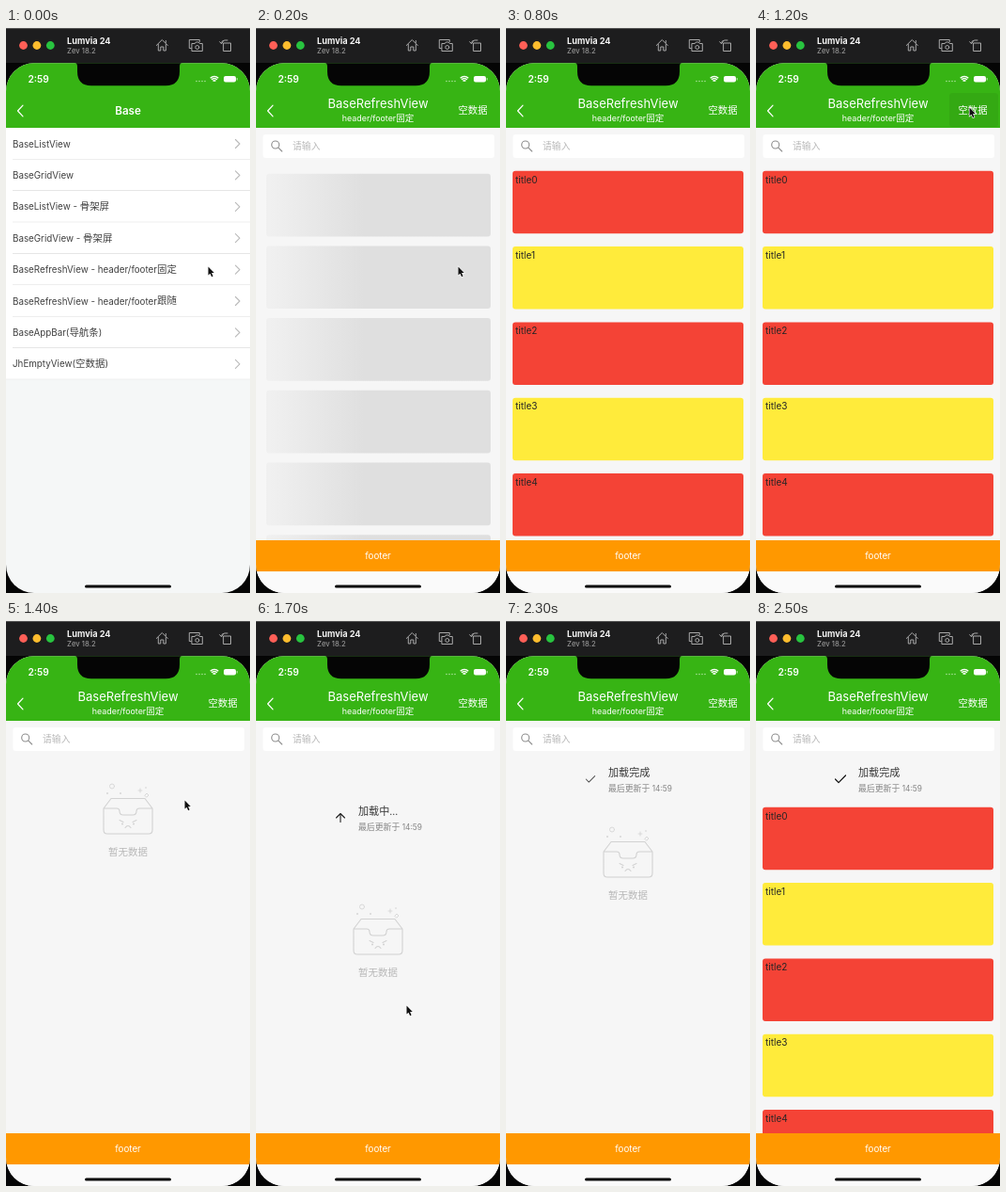
An HTML page with a canvas that plays this animation: 260 px wide and 600 px high, repeating every 2600 ms.

```html
<!DOCTYPE html>
<html lang="zh-CN">
<head>
<meta charset="utf-8">
<title>Refresh view</title>
<style>
html, body { margin: 0; width: 100%; height: 100%; overflow: hidden; background: #000; }
canvas { display: block; width: 260px; height: 600px; }
</style>
</head>
<body>
<canvas id="stage"></canvas>
<script>
const LOOP = 2600, STEP = 100;
const W = 260, H = 600;
const canvas = document.getElementById('stage');
const ctx = canvas.getContext('2d');
const dpr = window.devicePixelRatio || 1;
canvas.width = W * dpr;
canvas.height = H * dpr;

const GREEN = '#37b414', RED = '#f44336', YELLOW = '#ffeb3b', ORANGE = '#ff9800';
const FONT = 'Inter, "Noto Sans CJK SC", "Noto Sans CJK", sans-serif';
const CJK = /([\u3400-\u9fff]+)/;

// Key points: time, value(s)
const CURSOR = [[0, 215, 253], [300, 215, 253], [400, 221, 400], [500, 226, 596],
  [600, 227, 612], [900, 227, 612], [1000, 228, 330], [1100, 228, 130], [1200, 227, 84],
  [1300, 227, 84], [1400, 190, 190], [1500, 160, 270], [1600, 160, 350], [1700, 160, 408],
  [1800, 160, 408], [1900, 200, 470], [2000, 220, 612], [2600, 220, 612]];
const PULL = [[0, 0], [1500, 0], [1600, 66], [1700, 128], [1800, 68], [1900, 46], [2600, 46]];

function keyed(keys, t) {
  let i = 1;
  while (i < keys.length - 1 && t > keys[i][0]) i++;
  const a = keys[i - 1], b = keys[i];
  const k = Math.min(1, (t - a[0]) / (b[0] - a[0]));
  return a.slice(1).map((v, n) => v + (b[n + 1] - v) * k);
}

function rect(x, y, w, h, color, r = 0) {
  ctx.fillStyle = color;
  ctx.beginPath();
  ctx.roundRect(x, y, w, h, r);
  ctx.fill();
}

function disc(x, y, r, color) {
  ctx.fillStyle = color;
  ctx.beginPath();
  ctx.arc(x, y, r, 0, 7);
  ctx.fill();
}

function stroke(d, color, width = 1, x = 0, y = 0, scale = 1) {
  ctx.save();
  ctx.translate(x, y);
  ctx.scale(scale, scale);
  ctx.strokeStyle = color;
  ctx.lineWidth = width;
  ctx.lineJoin = ctx.lineCap = 'round';
  ctx.stroke(new Path2D(d));
  ctx.restore();
}

// Chinese runs are set slightly larger and higher than Latin ones
function text(str, x, y, size, color, { align = 'left', weight = 400 } = {}) {
  const runs = str.split(CJK).filter(Boolean).map(s => {
    const cjk = CJK.test(s);
    const font = `${weight} ${cjk ? size * 1.07 : size}px ${FONT}`;
    ctx.font = font;
    return { s, font, w: ctx.measureText(s).width, rise: cjk ? 0.03 : 0 };
  });
  const total = runs.reduce((sum, r) => sum + r.w, 0);
  if (align === 'center') x -= total / 2;
  if (align === 'right') x -= total;
  ctx.fillStyle = color;
  for (const r of runs) {
    ctx.font = r.font;
    ctx.fillText(r.s, x, y + size * (0.37 - r.rise));
    x += r.w;
  }
}

function toolbar() {
  rect(0, 0, W, 37, '#1d1d1e');
  rect(0, 0, W, 1, '#565656');
  ['#fe5f57', '#febc2e', '#28c33f'].forEach((c, i) => disc(18.5 + i * 14.4, 18.5, 4.4, c));
  text('Lumvia 24', 65, 14, 9.2, '#f4f4f4', { weight: 700 });
  text('Zev 18.2', 65, 24.3, 7.8, '#a4a4a4');
  const c = '#a9a9a9';
  stroke('M-6 0L0 -6L6 0M-4 -1V5.5H-1.5V1.5H1.5V5.5H4V-1M4 -5V-3', c, 1, 166.3, 18.5);
  stroke('M-5 3H-7V-6H4V-4M-4 -2H-1L0 -3.5H3L4 -2H7V6H-4ZM3.5 2A2 2 0 1 1 -0.5 2A2 2 0 1 1 3.5 2',
    c, 1, 202.3, 18.5);
  stroke('M-2.5 -2.5H5V6H-2.5ZM-5 -2Q-5 -5.5 -1.5 -5.5H1.5M-6.8 -3.8L-5 -1.8L-3.2 -3.8', c, 1, 234.5, 18.5);
}

function statusBar() {
  text('2:59', 23.5, 54.5, 10.2, '#fff', { weight: 600 });
  for (let i = 0; i < 4; i++) disc(203 + i * 3, 56.5, 0.65, '#c5edba');
  for (const r of [2.2, 4.4, 6.4]) {
    ctx.strokeStyle = '#fff';
    ctx.lineWidth = 1.5;
    ctx.beginPath();
    ctx.arc(222, 58, r, -2.3, -0.84);
    ctx.stroke();
  }
  rect(232, 51, 13, 6.5, '#fff', 2);
  rect(245.7, 53, 1, 2.5, '#c5edba', 0.5);
}

function header(inner, t) {
  rect(0, 37, W, 69, GREEN);
  statusBar();
  stroke('M5.5 -5.8L0 0L5.5 5.8', '#fff', 1.2, 12.5, 88);
  if (!inner) {
    text('Base', 130, 88, 11.6, '#fff', { align: 'center', weight: 600 });
    return;
  }
  if (t === 1200) rect(206, 69, 52, 36, 'rgba(0,0,0,.06)', 3);
  text('BaseRefreshView', 130, 80.5, 13, '#fff', { align: 'center' });
  text('header/footer固定', 130, 95.8, 8.9, '#fff', { align: 'center' });
  text('空数据', 246.5, 88, 9.7, '#fff', { align: 'right' });
}

function menu() {
  const rows = ['BaseListView', 'BaseGridView', 'BaseListView - 骨架屏', 'BaseGridView - 骨架屏',
    'BaseRefreshView - header/footer固定', 'BaseRefreshView - header/footer跟随',
    'BaseAppBar(导航条)', 'JhEmptyView(空数据)'];
  const pitch = 33.4;
  rect(0, 106, W, pitch * rows.length, '#fff');
  rows.forEach((row, i) => {
    const y = 106 + i * pitch;
    text(row, 7, y + 17, 9.8, '#404040');
    stroke('M-2.5 -4.5L2 0L-2.5 4.5', '#b9b9b9', 1.1, 247, y + 17);
    rect(i < rows.length - 1 ? 7 : 0, y + pitch - 0.5, W, 0.6, '#dedede');
  });
}

function search() {
  rect(7.5, 113, 246.5, 25, '#fff', 3);
  stroke('M3.2 3.2L7 7M4 0A4 4 0 1 1 -4 0A4 4 0 1 1 4 0', '#8f8f8f', 1.1, 20.7, 124);
  text('请输入', 39, 125.8, 9.2, '#b8b8b8');
}

function skeleton(t) {
  const x = 15 + (t - 200) * 0.9;
  const g = ctx.createLinearGradient(x - 100, 0, x + 100, 0);
  g.addColorStop(0, '#dfdfdf');
  g.addColorStop(0.5, '#f0f0f0');
  g.addColorStop(1, '#dfdfdf');
  for (let i = 0; i < 6; i++) rect(11, 154.7 + i * 76.7, 239, 66.7, g, 3);
}

function cards(dy) {
  for (let i = 0; i < 5; i++) {
    const y = 151.8 + i * 80.3 + dy;
    rect(7, y, 246, 66.5, i % 2 ? YELLOW : RED, 3);
    text('title' + i, 10, y + 9, 10, '#252525');
  }
}

function emptyState(dy) {
  const c = '#d2d2d2', y = 176 + dy;
  stroke('M0 23L8 12.5H44L52 23V46Q52 50 48 50H4Q0 50 0 46ZM0 23H14Q17 23 17 26Q17 30 21 30H31Q35 30 35 26Q35 23 38 23H52' +
    'M17 35.5L21 37.5M35 35.5L31 37.5M23 43.5Q26 39.5 29 43.5', c, 1.1, 104, y);
  disc(124, y + 39.5, 1, c);
  disc(136, y + 39.5, 1, c);
  stroke('M2.5 0A2.5 2.5 0 1 1 -2.5 0A2.5 2.5 0 1 1 2.5 0', c, 0.8, 113, y - 0.5);
  stroke('M-2 0H2M0 -2V2', c, 0.8, 143, y + 4);
  stroke('M-2 0L0 -2L2 0L0 2Z', c, 0.8, 150, y + 9);
  disc(122, y + 7, 0.9, c);
  disc(108, y + 7, 0.9, c);
  disc(149, y + 1, 0.8, c);
  text('暂无数据', 130, y + 70, 9.8, '#b8b8b8', { align: 'center' });
}

function refreshHeader(pull, t) {
  const y = 145 + pull / 2;
  const done = t >= 2300;
  const label = done ? '加载完成' : t >= 1700 ? '加载中...' : '下拉刷新';
  if (done) {
    const grow = t === 2300 ? 0.85 : 1;
    stroke('M-5.5 0L-2 3.6L5.5 -4', t === 2300 ? '#555' : '#111', 1.2, 90, y, grow);
  } else if (t >= 1800) {
    const a = t / 100;
    ctx.strokeStyle = '#222';
    ctx.lineWidth = 1.3;
    ctx.beginPath();
    ctx.arc(90, y, 5, a, a + 4);
    ctx.stroke();
  } else {
    const d = t === 1700 ? 'M0 4.5V-4.5M-4.5 0L0 -4.5L4.5 0' : 'M0 -4.5V4.5M-4.5 0L0 4.5L4.5 0';
    stroke(d, '#222', 1.1, 90, y);
  }
  text(label, 109, y - 6.8, 10.4, '#383838');
  text('最后更新于 14:59', 109, y + 10, 8.3, '#848484');
}

function refreshPage(t) {
  const [pull] = keyed(PULL, t);
  ctx.save();
  ctx.beginPath();
  ctx.rect(0, 145, W, 399);
  ctx.clip();
  if (pull > 0) refreshHeader(pull, t);
  if (t < 400) skeleton(t);
  else if (t >= 1300 && t < 2400) emptyState(pull);
  else cards(pull);
  ctx.restore();
  search();
  rect(0, 544, W, 33.3, ORANGE);
  text('footer', 130, 560.5, 9.8, '#fff', { align: 'center' });
  rect(0, 577.3, W, 23, '#fafafa');
}

function cursor(t) {
  const [x, y] = keyed(CURSOR, t);
  const arrow = new Path2D('M0 0V9L2 7.2L3.7 10.7L5.1 10.1L3.6 6.6H6.3Z');
  ctx.save();
  ctx.translate(x + 0.5, y + 0.5);
  ctx.lineWidth = 1.2;
  ctx.strokeStyle = '#fff';
  ctx.stroke(arrow);
  ctx.fillStyle = '#111';
  ctx.fill(arrow);
  ctx.restore();
}

function draw(t) {
  ctx.setTransform(dpr, 0, 0, dpr, 0, 0);
  rect(0, 0, W, H, '#050505');
  toolbar();

  const inner = t >= 100;
  ctx.save();
  ctx.beginPath();
  ctx.roundRect(0, 37.3, W, 562.7, 30);
  ctx.clip();
  rect(0, 37, W, 563, inner ? '#f6f6f6' : '#f5f7f7');
  header(inner, t);
  if (inner) refreshPage(t);
  else menu();
  ctx.fillStyle = '#050505';
  ctx.fill(new Path2D('M73 37Q76 37 76 41V46Q76 61.3 91 61.3H170Q185 61.3 185 46V41Q185 37 188 37Z'));
  rect(84, 591.4, 92, 3.2, '#080808', 1.6);
  ctx.restore();

  cursor(t);
}

const start = performance.now();
function tick() {
  const t = (performance.now() - start) % LOOP;
  draw(Math.floor(t / STEP) * STEP);
  requestAnimationFrame(tick);
}
tick();
</script>
</body>
</html>
```
